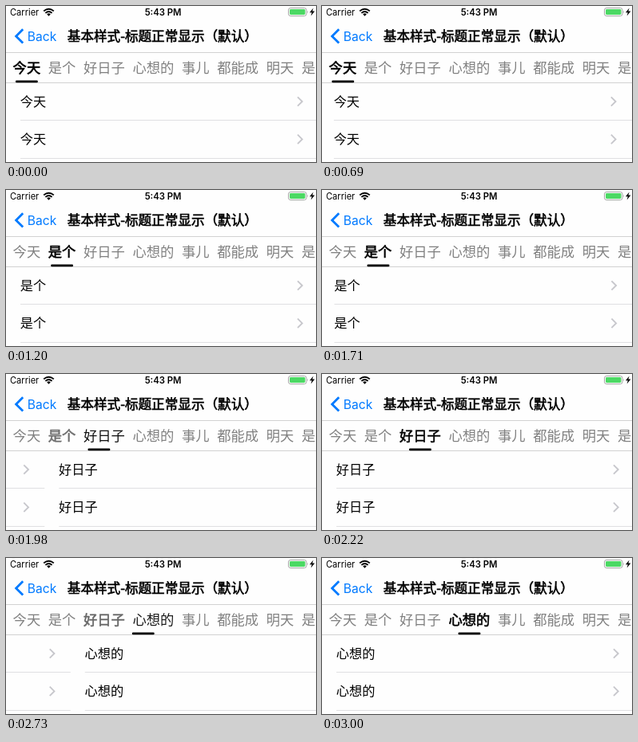
Animation of 388 by 196 pixels, one loop 3.75 s. Source, as an HTML page:

```html
<!DOCTYPE html>
<html lang="zh-CN">
<head>
<meta charset="utf-8">
<title>Tabs</title>
<style>
  html, body { margin: 0; width: 100%; height: 100%; overflow: hidden; background: #fefefe; }
  svg { display: block; width: 388px; height: 196px; }
  text { font-family: "Noto Sans CJK SC", "Noto Sans CJK", sans-serif; white-space: pre; }
  .latin { font-family: Inter, "Liberation Sans", sans-serif; }
  .tab { font-size: 17.3px; }
  .cell { font-size: 16.2px; }
  .strong { stroke: currentColor; stroke-width: .6px; }
</style>
</head>
<body>
<svg viewBox="0 0 388 196">
  <g id="pages"></g>

  <text class="latin" x="5" y="12" font-size="11.1">Carrier</text>
  <g fill="none" stroke="#000" stroke-width="1.9">
    <path d="M47.2 6.4Q53.5 .9 59.8 6.4"/>
    <path d="M49.4 8.9Q53.5 5.3 57.6 8.9"/>
  </g>
  <path d="M51.2 10.3Q53.5 8.4 55.8 10.3L53.5 12.7Z"/>
  <text class="latin" x="173.7" y="12" font-size="11.3" font-weight="600">5:43 PM</text>
  <rect x="353.5" y="2.5" width="22.5" height="10" rx="2.6" fill="#fff" stroke="#a4a4a4"/>
  <rect x="355" y="4" width="19.5" height="7" rx="1.4" fill="#4cd964"/>
  <path d="M377 5.8Q378.5 7.5 377 9.2Z" fill="#a4a4a4"/>
  <path d="M384.6 2.5L380 8.2H382.8L381.6 12.6L386.4 6.6H383.4Z"/>

  <path d="M21.2 29.2L12.6 37.9L21.2 46.6" fill="none" stroke="#007aff" stroke-width="2.8"/>
  <text class="latin" x="26.8" y="43.6" font-size="15.6" fill="#007aff">Back</text>
  <text class="strong" x="76.8" y="44" font-size="16.6">基本样式-标题正常显示（默认）</text>
  <rect y="58" width="388" height="1" fill="#d2d2d2"/>

  <g id="tabs"></g>
  <rect y="96" width="388" height="1" fill="#d2d2d2"/>
  <rect id="bar" y="93.6" width="28" height="2.6" rx="1.3"/>
</svg>
<script>
const LOOP = 3750, TICK = 30, PAGE = 391, CHAR = 17.3, GAP = 9.6, GRAY = 128;
const titles = ['今天', '是个', '好日子', '心想的', '事儿', '都能成', '明天', '是个'];

// Each swipe begins at `touch` and is seen in `count` steps from `first` to `last` (ms).
const swipes = [
  { touch: 682, first: 690, last: 1200, count: 10 },
  { touch: 1703, first: 1710, last: 2220, count: 9 },
  { touch: 2499, first: 2550, last: 3000, count: 9 }
];

const $ = id => document.getElementById(id);
const ease = u => 1 - (1 - u ** 1.5) ** 4.2;

function add(parent, tag, attrs, text = '') {
  const el = document.createElementNS('http://www.w3.org/2000/svg', tag);
  for (const key in attrs) el.setAttribute(key, attrs[key]);
  el.textContent = text;
  return parent.appendChild(el);
}

const steps = [{ time: 0, pos: 0 }];
swipes.forEach(({ touch, first, last, count }, page) => {
  for (let k = 0; k < count; k++) {
    const even = first + (last - first) * k / (count - 1);
    const time = Math.round(even / TICK) * TICK;
    steps.push({ time, pos: page + ease((time - touch) / (last - touch)) });
  }
});

let left = 8.6;
const tabs = titles.map(title => {
  const width = title.length * CHAR;
  const el = add($('tabs'), 'text', { class: 'tab', x: left, y: 83.6 }, title);
  const center = left + width / 2;
  left += width + GAP;
  return { el, center };
});

const pages = titles.slice(0, swipes.length + 1).map(title => {
  const page = add($('pages'), 'g', {});
  for (const y of [120, 167.4]) {
    add(page, 'text', { class: 'cell', x: 17.8, y: Math.floor(y + 6) }, title);
    add(page, 'path', {
      d: `M365 ${y - 5.7}l5.7 5.7l-5.7 5.7`, fill: 'none', stroke: '#c7c7cc', 'stroke-width': 1.9
    });
    add(page, 'rect', { x: 18, y: Math.ceil(y + 23), width: PAGE - 18, height: 1, fill: '#e0e0e2' });
  }
  return page;
});

function draw(now) {
  const { pos } = steps.findLast(step => step.time <= now);
  const index = Math.floor(pos), part = pos - index;

  pages.forEach((page, i) => page.setAttribute('transform', `translate(${(i - pos) * PAGE})`));
  tabs.forEach(({ el }, i) => {
    const shade = Math.round(GRAY * Math.min(1, Math.abs(i - pos)));
    el.style.color = el.style.fill = `rgb(${shade},${shade},${shade})`;
    el.classList.toggle('strong', i === index);
  });
  const from = tabs[index].center, to = tabs[index + 1].center;
  $('bar').setAttribute('x', from + (to - from) * part - 14);
}

const start = performance.now();
function tick() {
  draw((performance.now() - start) % LOOP);
  requestAnimationFrame(tick);
}
tick();
</script>
</body>
</html>
```
